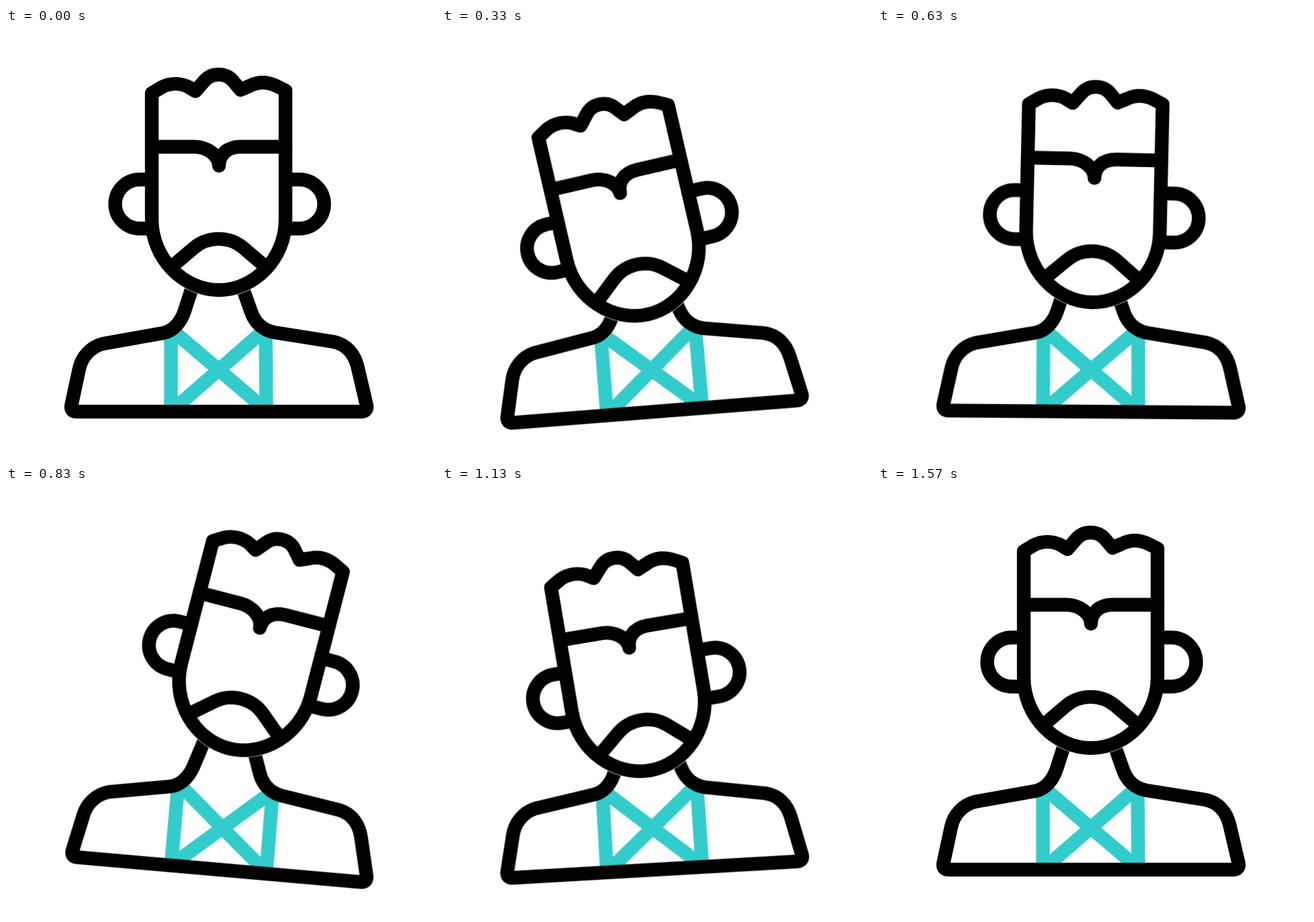
Write an HTML page that moves like this. It is 640x640 px and loops after 2 s.

```html
<!DOCTYPE html>
<html lang="en">
<head>
<meta charset="utf-8">
<title>Swaying man</title>
<style>
  html, body { margin: 0; width: 100%; height: 100%; overflow: hidden; background: #fff; }
  svg { display: block; width: 100%; height: 100%; }
  path { fill: none; stroke: #000; stroke-width: 20.4; stroke-linejoin: round; }
  .strap { stroke: #33cccc; }
  .face { fill: #fff; }
  .halo { stroke: #fff; stroke-width: 21.4; }
  .tip { stroke-linecap: round; }

  .body, .head {
    animation: sway 2s cubic-bezier(.333, 0, .667, 1) infinite;
  }
  .body { transform-origin: 317px 571px; }
  .head { transform-origin: 317px 382px; animation-name: nod; }

  @keyframes sway {
    0%, 78%, 100% { transform: rotate(0deg); }
    20.65%, 62% { transform: rotate(-5deg); }
    41.25% { transform: rotate(5deg); }
  }
  @keyframes nod {
    0%, 78%, 100% { transform: translateY(0px) rotate(0deg); }
    20.65%, 62% { transform: translateY(40px) rotate(-9.5deg); }
    41.25% { transform: translateY(0px) rotate(9.5deg); }
  }
</style>
</head>
<body>
<svg viewBox="0 0 640 640">
  <defs>
    <path id="face" d="M217 97 L232 88 C245 81 261 82 272 88 L282 94 L295 79 C306 66 327 66 338 79
      L349 92 L363 86 C375 80 389 80 402 86 L416 93 V285 C416 343 370 390 317 390 C264 390 217 343 217 285 Z"/>
  </defs>
  <g class="body">
    <path class="strap" d="M245.5 456 V568 M386.5 457 L387.5 568"/>
    <path class="strap" d="M250 452 L384 566 M383 451 L250 567"/>
    <path d="M281 374 L265.5 422 C260 438 249 451 234 454 L144 470 C126 475 113 489 109 507
      L97.2 562 Q96 571 105 571 H528 Q538 571 536.8 562 L523.5 505 C519 486 507 471 487.5 467
      L399 453 C384 450 371 440 365 423 L348 375"/>
    <g class="head">
      <path class="halo" d="M217 285 C217 343 264 390 317 390 C370 390 416 343 416 285"/>
      <path d="M217 225.5 H199 A36.5 36.5 0 0 0 199 298.5 H217 M416 225.5 H437 A36.5 36.5 0 0 1 437 298.5 H416"/>
      <path class="face" d="M217 97 L232 88 C245 81 261 82 272 88 L282 94 L295 79 C306 66 327 66 338 79
        L349 92 L363 86 C375 80 389 80 402 86 L416 93 V285 C416 343 370 390 317 390 C264 390 217 343 217 285 Z"/>
      <path class="tip" d="M217 176.7 H281 C300 177 317 190 317 205 C317 188 330 177 348 176.7 H416"/>
      <path d="M246 356 L280 327 C301 309.5 332 309.5 353 327 L387 356"/>
    </g>
  </g>
</svg>
</body>
</html>
```
